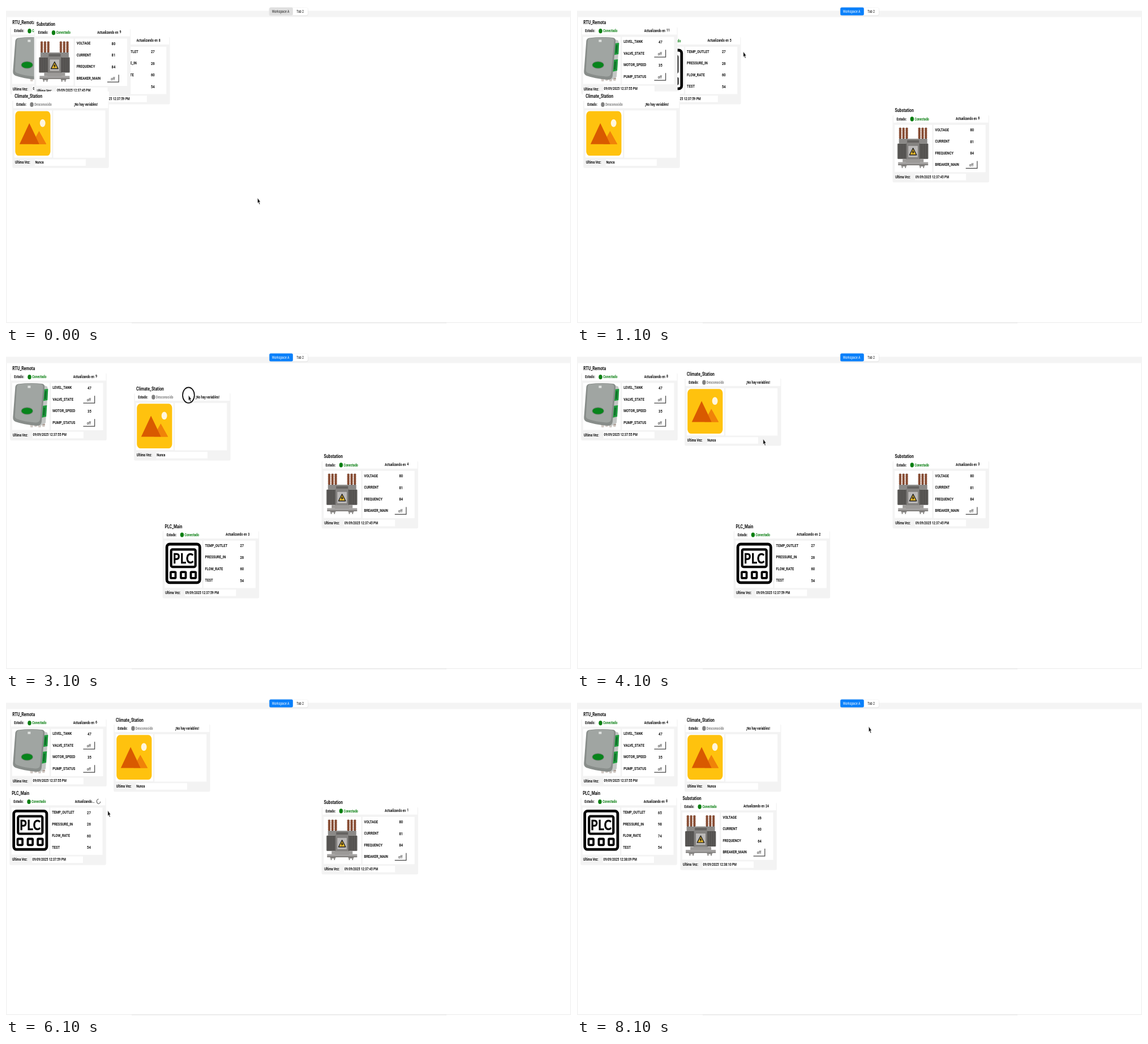
An HTML page for the animation above (9100 ms loop, 998x561 px).

```html
<!DOCTYPE html>
<html lang="es">
<head>
<meta charset="utf-8">
<title>Workspace A</title>
<style>
html, body { margin: 0; width: 100%; height: 100%; overflow: hidden; background: #fff; }
svg { display: block; width: 100vw; height: 100vh; }
text { font-family: Roboto, "Liberation Sans", sans-serif; font-weight: 700; fill: #111; }
.reg { font-weight: 400; }
.plc { font-family: Lato, Roboto, sans-serif; letter-spacing: 0.8px; fill: #000; stroke: #000; stroke-width: 0.6; }
</style>
</head>
<body>
<svg id="stage" viewBox="0 0 998 561" preserveAspectRatio="none"></svg>
<script>
const SQUASH = 0.78; // the whole screen is narrowed horizontally
const LOOP = 9100;
const GREY = '#f3f3f3';

const rect = (x, y, w, h, fill, more = '') =>
  `<rect x="${x}" y="${y}" width="${w}" height="${h}" fill="${fill}" ${more}/>`;
const oval = (x, y, rx, ry, fill, more = '') =>
  `<ellipse cx="${x}" cy="${y}" rx="${rx}" ry="${ry}" fill="${fill}" ${more}/>`;
const path = (d, fill, more = '') => `<path d="${d}" fill="${fill}" ${more}/>`;
// y is the middle of the capitals
const text = (x, y, size, str, more = '') =>
  `<text transform="translate(${x} ${y + size * 0.355}) scale(${SQUASH} 1)" font-size="${size}" ${more}>${str}</text>`;
const frame = (x, y, w, h, r, line) =>
  rect(x + line / 2, y + line / 2, w - line, h - line, 'none', `rx="${r}" stroke="#000" stroke-width="${line}"`);

function plcIcon() {
  return frame(5.4, 29.2, 63, 72.6, 5, 4.8) + frame(13.3, 38.8, 47.2, 35, 2.5, 4.2) +
    text(37, 56.4, 25.5, 'PLC', 'class="plc" text-anchor="middle"') +
    [12.7, 30.7, 48.3].map(x => frame(x, 78.8, 12.4, 14.6, 1.2, 3.8)).join('');
}

function rtuIcon() {
  const glands = [36, 43, 50, 57].map((x, i) =>
    rect(x, 92 + i % 2, 4.8, 12 - i % 2 * 2, '#d2cbc6', 'rx="1.5"') +
    rect(x, 98, 4.8, 2, '#a8968e')).join('');
  return glands +
    path('M58 29 L66 32 L67.5 38 L63 96 L53 102 Z', '#c3c6c4') +
    path('M59 37 L67.4 36 L66.4 56 L58 57.5 Z M57 66 L65.4 65 L64.2 85 L55.5 87 Z', '#1d9a3c') +
    path('M62 40 L64.5 40 L63.5 54 L61 54 Z M59.5 69 L62 69 L61 83 L58.5 83 Z', '#126b2a') +
    path('M14 27.5 Q36 24.8 57 27 Q62 28 61.2 34 L56 94 Q55 102 46 101 Q24 99 10 94 Q5 92 5.4 86 L9.5 33 Q10 28.5 14 27.5 Z', '#888d8a') +
    path('M15.5 28.2 Q36 25.6 55 27.8 Q59.2 28.6 58.6 34 L53.4 89 Q52.5 96 45 95.5 Q25 94 12 89 Q8.6 87.5 9 83 L12 33 Q12.4 29 15.5 28.2 Z', '#a0a5a2') +
    oval(30.3, 75, 10.8, 6.7, '#77857a') + oval(30.3, 75, 9.8, 5.6, '#07841b') +
    rect(31.5, 30.5, 5, 4, '#dfe2e0');
}

function subIcon() {
  const bushings = [11.4, 17.2, 23, 45.2, 51, 56.8].map(x => {
    let s = rect(x + 0.6, 30.5, 3.4, 20.5, '#6f3f2c');
    for (let y = 31.5; y < 49; y += 3) s += rect(x, y, 4.6, 2, '#935438', 'rx=".8"');
    return s;
  }).join('');
  const fins = [9, 47.6].map(x => {
    let s = rect(x, 58.5, 15.6, 27, '#4d4b49', 'rx="1"');
    for (let i = 0; i < 5; i++) s += rect(x + 1.3 + i * 3, 59, 1, 26, '#6b6967');
    return s;
  }).join('');
  const feet = [15.5, 47.5].map(x => rect(x, 97, 9.5, 1.6, '#6d6b69') +
    rect(x + 0.8, 98, 2, 3.6, '#8a8886') + rect(x + 6.5, 98, 2, 3.6, '#8a8886')).join('');
  return bushings + rect(11.5, 50, 50, 8.5, '#8b8987') + rect(26, 52.5, 21, 4.5, '#656361') +
    rect(23.8, 57, 25, 35, '#858381') + fins + rect(18, 86, 37, 5.5, '#9c9a98') +
    rect(10, 91.3, 53, 5.2, '#a3a1a0') + rect(10, 95.3, 53, 1.4, '#6f6d6b') + feet +
    rect(27.6, 62, 17.6, 21, '#bbb9b8', 'stroke="#716f6d" stroke-width=".7"') +
    path('M36.4 66.5 L42.6 78.5 H30.2 Z', '#e6b62a', 'stroke="#222" stroke-width="1.4" stroke-linejoin="round"') +
    path('M37.2 69 L34.5 74.2 H36.3 L35.3 77.6 L38.6 72.9 H36.8 Z', '#111');
}

function photoIcon() {
  return rect(5.4, 26.8, 62.2, 78.6, '#ffc20e', 'rx="6" ry="7.5"') +
    oval(53.8, 47.9, 4.9, 6.9, '#fff6dd') +
    path('M47.5 62 L60.3 85 H35.5 Z', '#f08209') +
    path('M30.3 48 L41.8 72 L48 85 H13 Z', '#d95a00') +
    path('M47.5 62 L60.3 85 H48 L41.8 72 Z', '#f08209');
}

function card(id, title, icon, rows, date) {
  const on = rows.length > 0;
  const color = on ? '#0a7f12' : '#808080';
  const body = rows.map((name, i) => {
    const y = 33.7 + i * 20.5;
    const button = /STATE|STATUS|BREAKER/.test(name);
    const value = button
      ? path(`M129.5 ${y + 7} H149.7 V${y - 6}`, 'none', 'stroke="#444" stroke-width="1.2"') +
        text(139.5, y + 1, 7.4, 'off', 'class="reg" text-anchor="middle"')
      : text(140.5, y + 0.6, 7.4, '', `id="${id}-v${i}" text-anchor="middle"`);
    return text(75.3, y, 7.4, name) + value;
  }).join('');
  return `<g id="${id}">` +
    rect(0, -8, 171, 20, '#fff') +
    rect(0.3, 8, 170.5, 119, GREY, 'rx="2.5"') +
    rect(2, 6, 167.5, 15.5, '#fff') +
    rect(4, 25.5, 66, 83, '#fff') + rect(72.5, 25.5, 92, 83.5, '#fff') +
    rect(40, 111.7, 90, 11.5, '#fff') +
    text(4.3, 0, 8.8, title) +
    text(7.4, 15, 6.7, 'Estado:') + oval(34.6, 15.2, 3.2, 4.1, color) +
    text(39.3, 15, 6.7, on ? 'Conectado' : 'Desconocido', `style="fill:${color}"`) +
    (on
      ? `<g id="${id}-wait">` + text(111.8, 14.5, 6.6, 'Actualizando en') +
        text(151, 13.9, 6.7, '', `id="${id}-n"`) + '</g>' +
        `<g id="${id}-busy" visibility="hidden">` + text(115.8, 14.5, 6.6, 'Actualizando...') +
        path('M157.6 10.7 A3.1 4 0 1 0 160.6 15', 'none', 'stroke="#222" stroke-width=".9"') + '</g>'
      : text(109.3, 14.8, 6.7, '¡No hay variables!')) +
    icon + body +
    text(5, 117.3, 6.7, 'Ultima Vez:') + text(40.5, 117, 6.7, date, `id="${id}-date"`) +
    '</g>';
}

const chrome =
  rect(0, 0, 998, 561, '#fff') + rect(0, 8.5, 998, 11, '#f4f4f4') +
  path('M.5 19.5 V558.5 H997.5 V19.5', 'none', 'stroke="#ececec" stroke-width="1"') +
  rect(222, 558, 556, 1.5, '#e6e6e6') +
  rect(464.5, 2.6, 69, 14.8, '#e2e2e2', 'rx="3.5"') + rect(465, 2.5, 68, 14, '#fff', 'rx="3"') +
  rect(465.2, 2.6, 41.6, 13.8, '#0a80fa', 'id="tab" rx="2.5"') +
  text(469.8, 9.5, 6.7, 'Workspace A', 'id="tab-name" class="reg"') +
  text(513.2, 9.5, 6.7, 'Tab 2', 'class="reg"');

const pointer = '<g id="pointer">' +
  oval(0, 0, 10.4, 13.7, '#fff', 'id="ring" fill-opacity=".88" stroke="#111" stroke-width="1.8"') +
  path('M0 0 V9.6 L1.7 7.7 L3 11.6 L4.4 10.9 L3.1 7.2 H5.2 Z', '#111', 'stroke="#fff" stroke-width=".5"') +
  '</g>';

const stage = document.getElementById('stage');
stage.innerHTML = chrome +
  card('plc', 'PLC_Main', plcIcon(), ['TEMP_OUTLET', 'PRESSURE_IN', 'FLOW_RATE', 'TEST'], '') +
  card('rtu', 'RTU_Remota', rtuIcon(), ['LEVEL_TANK', 'VALVE_STATE', 'MOTOR_SPEED', 'PUMP_STATUS'], '09/09/2025 12:37:55 PM') +
  card('sub', 'Substation', subIcon(), ['VOLTAGE', 'CURRENT', 'FREQUENCY', 'BREAKER_MAIN'], '') +
  card('cli', 'Climate_Station', photoIcon(), [], 'Nunca') + pointer;

const $ = id => document.getElementById(id);
const put = (id, str) => { $(id).textContent = str; };
const move = (id, [x, y]) => $(id).setAttribute('transform', `translate(${x} ${y})`);
const show = (id, on) => $(id).setAttribute('visibility', on ? 'visible' : 'hidden');

// Resting places of the cards
const plcA = [118.8, 46.4], plcB = [276.3, 307.4], plcC = [5.9, 167.8];
const subA = [49.4, 32], subB = [557.2, 184.2];
const cliA = [10.9, 158.7], cliB = [225.8, 64.5], cliC = [189.8, 38.5];

// start, pointer, pressed, plc, sub, climate, countdowns of plc, rtu, sub
const steps = [
  [0, [444.3, 338.5], 0, plcA, subA, cliA, 8, 14, 9],
  [100, [154, 40], 1, plcA, subA, cliA, 6, 12, 7],
  [1100, [293.8, 80.5], 0, plcA, subB, cliA, 5, 11, 6],
  [2100, [250, 230], 0, plcB, subB, cliA, 4, 10, 5],
  [3100, [322.4, 76.2], 1, plcB, subB, cliB, 3, 9, 4],
  [4100, [328.8, 153.5], 0, plcB, subB, cliC, 2, 8, 3],
  [5100, [122, 191], 1, [22, 179.5], subB, cliC, 1, 7, 2],
  [6100, [179.8, 198.5], 0, plcC, subB, cliC, 0, 6, 1],
  [7100, [299, 197.4], 1, plcC, [194.6, 190.2], cliC, 9, 5, 25],
  [8100, [515.3, 50.3], 0, plcC, [182.1, 176.6], cliC, 8, 4, 24]
];

function values(id, list) {
  list.forEach((v, i) => put(`${id}-v${i}`, v));
}

function draw(i) {
  const [start, tip, pressed, plc, sub, cli, plcN, rtuN, subN] = steps[i];
  const fresh = start >= 7100;
  const focus = start > 0;
  move('pointer', tip);
  show('ring', pressed);
  move('plc', plc);
  move('sub', sub);
  move('cli', cli);
  put('plc-n', plcN);
  put('rtu-n', rtuN);
  put('sub-n', subN);
  show('plc-wait', plcN > 0);
  show('plc-busy', plcN === 0);
  values('plc', fresh ? [65, 98, 74, 54] : [27, 26, 60, 54]);
  values('sub', fresh ? [26, 60, 64] : [80, 81, 84]);
  put('plc-date', `09/09/2025 12:${fresh ? '38:09' : '37:59'} PM`);
  put('sub-date', `09/09/2025 12:${fresh ? '38:10' : '37:45'} PM`);
  $('tab').setAttribute('fill', focus ? '#0a80fa' : '#dfdfdf');
  $('tab-name').style.fill = focus ? '#fff' : '#222';
}

move('rtu', [6.9, 29]);
put('rtu-v0', 47);
put('rtu-v2', 35);

const t0 = performance.now();
let shown = -1;
function tick() {
  const t = (performance.now() - t0) % LOOP;
  const i = steps.findLastIndex(s => s[0] <= t);
  if (i !== shown) draw(shown = i);
  requestAnimationFrame(tick);
}
tick();
</script>
</body>
</html>
```
